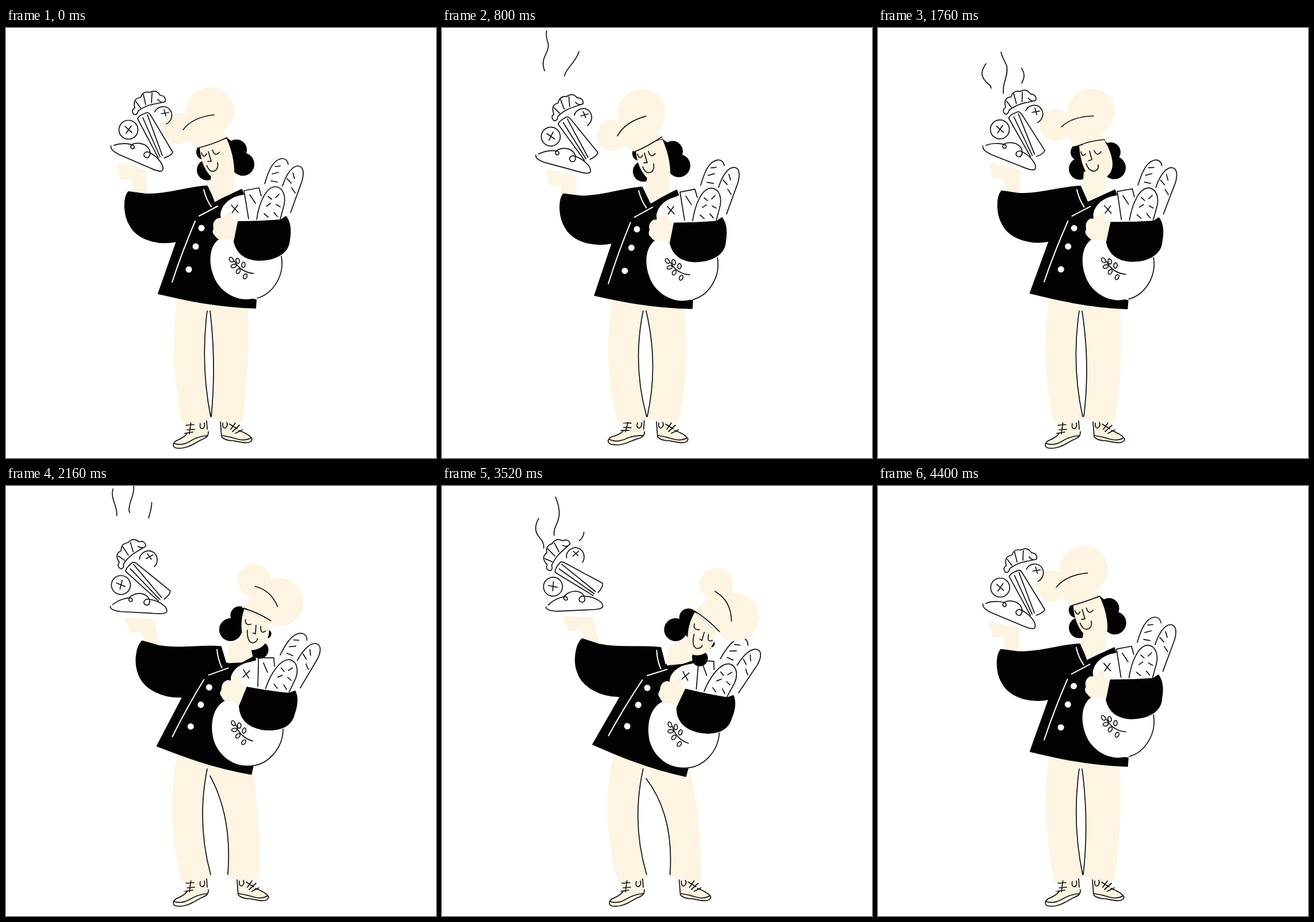
These frames come from a looping animation (748x748 px, 4480 ms). An HTML page:

```html
<!DOCTYPE html>
<html lang="en">
<head>
<meta charset="utf-8">
<title>Dancing baker</title>
<style>
html, body { margin: 0; width: 100%; height: 100%; overflow: hidden; background: #fff; }
svg { display: block; width: 100vw; height: 100vh; }
.ink { fill: none; stroke: #111; stroke-width: 1.7; stroke-linecap: round; stroke-linejoin: round; }
.chalk { fill: none; stroke: #fff; stroke-width: 2; stroke-linecap: round; }
.cream { fill: #fdf4e2; }
.black { fill: #030303; }
.white { fill: #fff; }
</style>
</head>
<body>
<svg viewBox="0 0 748 748">
  <g id="shoeL">
    <path class="cream" d="M308 684L350 682L351 706Q348 714 336 718Q316 732 299 731Q288 728 295 719Q312 712 316 702Z"/>
    <path class="ink" d="M349 682L350 698M352 702Q353 711 343 715C330 720 318 732 300 731C289 731 289 723 296 718Q311 712 315 705M293 723Q305 727 318 720Q334 710 351 709M322 684L319 706M313 691L327 690M315 699L328 698M311 705L325 703M338 688Q336 697 342 697Q347 694 345 687"/>
  </g>
  <g id="shoeR">
    <path class="cream" d="M373 684L400 684L406 699Q428 706 428 716Q422 723 398 719L376 713Z"/>
    <path class="ink" d="M373 685L375 711Q380 718 396 718C410 721 427 725 428 715Q424 707 405 700M376 709Q390 711 402 715Q416 719 426 713M377 687Q376 696 381 696Q387 692 384 686M389 689L402 697M391 698L399 687M394 702L406 691M399 705L411 699"/>
  </g>
  <path id="legL" class="cream"/>
  <path id="legR" class="cream"/>
  <path id="seams" class="ink"/>

  <g id="palm">
    <path class="cream" d="M193 240Q195 234 204 237L222 242Q236 243 245 249L245 290L218 290Q222 273 217 264Q208 264 200 263Q194 261 199 256Q193 253 197 249Q192 246 193 240Z"/>
  </g>
  <g id="torso">
    <path class="black" stroke="#030303" stroke-width="2" stroke-linejoin="round" d="M350 275C320 276 280 290 243 289L213 285C204 296 205 325 215 342C228 368 265 378 297 371L265 462C300 470 360 485 434 487L435 473L400 465L390 300L413 289L410 281L363 303Z"/>
    <path class="chalk" d="M344 281Q348 298 357 311M336 327L368 310M329 336Q306 390 289 442"/>
    <g class="white"><circle cx="340" cy="348" r="5.5"/><circle cx="330" cy="380" r="5.5"/><circle cx="318" cy="420" r="5.5"/></g>
  </g>
  <g id="bag">
    <path class="white" d="M413 290C390 293 374 308 373 325C374 335 380 350 372 366C354 378 352 405 360 428C368 455 395 473 420 472C455 470 480 445 480 410L480 340Z"/>
    <path class="ink" d="M479 397C485 430 465 462 437 470M392 308L404 321M403 308L393 322"/>
    <path class="ink" d="M450 271C456 250 464 229 480 227Q489 227 491 237M463 254L474 251M468 241L477 240M461 266L472 268"/>
    <path class="ink white" style="fill:#fff" d="M481 275C487 256 497 240 508 240C519 241 518 255 515 266L495 321M489 262L496 270M499 252L502 262M497 278L503 287"/>
    <path class="ink" d="M422 332L414 283L440 278L444 292M424 290L434 305"/>
    <path class="ink" style="fill:#fff" d="M436 333C440 305 452 277 468 276C484 277 486 295 484 306L477 333M456 293L462 298M469 295L475 289M453 310L460 305M470 307L477 311M449 323L456 329M466 321L472 328"/>
    <g class="ink" id="sprig"><path d="M397 405Q408 425 431 427"/></g>
    <path class="cream" d="M386 320Q391 314 394 324L392 331L405 340L398 374Q388 365 378 368Q368 369 364 362Q357 357 361 349Q358 337 368 331Q380 332 386 320Z"/>
    <path class="black" stroke="#030303" stroke-width="2" stroke-linejoin="round" d="M404 337Q440 337 478 334L487 328C493 336 496 350 493 368C492 392 468 404 440 404C415 403 402 392 397 372Z"/>
  </g>

  <g id="head">
    <g id="hair" class="black"></g>
    <g id="face"></g>
    <g id="hat"></g>
  </g>

  <g id="food" class="ink">
    <path transform="translate(1 -5) rotate(24.4 181 212)" d="M185 207C195 197 209 193 216 193C222 196 217 202 213 198C210 191 222 184 233 184C245 185 251 194 248 202C240 207 235 197 243 193C261 192 279 202 280 211C280 217 265 217 250 217L200 218Q181 217 181 210"/>
    <g id="pile">
      <circle cx="213" cy="177" r="16.5"/>
      <path d="M207 171L219 182M218 170L209 183"/>
      <path d="M259 146C262 136 280 132 287 145C291 155 286 163 279 167M270 149L283 147M275 142L278 153"/>
      <path d="M265 226L229 158Q230 152 246 147Q250 148 253 154L290 216Q288 222 275 226M246 151L272 222M238 156L268 224"/>
      <path d="M222 150Q217 143 224 139Q220 122 234 121Q238 109 250 112Q262 106 268 117Q279 118 277 128Q270 132 264 124M222 150Q228 153 230 144Q240 137 250 134Q262 131 270 130M226 128L234 139M239 116L243 133M254 113L253 130"/>
    </g>
  </g>
  <g id="steam" class="ink"></g>
</svg>
<script>
const LOOP = 4480, STEP = 80;
const $ = id => document.getElementById(id);
const lerp = (a, b, u) => a + (b - a) * u;

function add(parent, tag, attrs) {
  const el = document.createElementNS('http://www.w3.org/2000/svg', tag);
  for (const name in attrs) el.setAttribute(name, attrs[name]);
  return parent.appendChild(el);
}

// Smooth monotone curve through [time, value] pairs.
function track(...keys) {
  const slope = i => (keys[i + 1][1] - keys[i][1]) / (keys[i + 1][0] - keys[i][0]);
  const tangent = i => {
    if (i === 0 || i === keys.length - 1) return 0;
    const a = slope(i - 1), b = slope(i);
    return a * b <= 0 ? 0 : 2 * a * b / (a + b);
  };
  return t => {
    let i = 0;
    while (i < keys.length - 2 && t >= keys[i + 1][0]) i++;
    const [t0, v0] = keys[i], [t1, v1] = keys[i + 1];
    const d = t1 - t0, u = Math.min(1, Math.max(0, (t - t0) / d)), s = u * u * (3 - 2 * u);
    return lerp(v0, v1, s) + d * u * (1 - u) * (tangent(i) * (1 - u) - tangent(i + 1) * u);
  };
}

const reach = track([0, 0], [400, 1], [640, 1.4], [1120, .7], [1200, .53], [1700, 0], [LOOP, 0]);
const bob = track([0, 0], [400, 2.4], [1200, 2.4], [1720, 0], [LOOP, 0]);
const lean = track([0, 0], [1600, 0], [1760, .07], [2240, .93], [2400, 1.02], [2560, 1], [3520, 1.06],
  [3840, 1.05], [3920, .95], [4240, .2], [4400, .03], [LOOP, 0]);
const turn = track([0, 0], [1280, 0], [1760, 1], [2240, 1.9], [2560, 2], [3840, 2], [4240, .7], [4400, .2], [LOOP, 0]);
const nod = track([0, 0], [2560, 0], [3520, 1], [3800, 1], [4100, 0], [LOOP, 0]);
const tilt = track([0, 0], [400, -4], [1200, -12], [1760, 0], [LOOP, 0]);
const knees = track([0, 0], [400, 1], [1200, .5], [1760, .2], [2400, 1], [3900, 1], [4400, .1], [LOOP, 0]);
const stride = track([0, 0], [1700, 0], [1760, .03], [2240, .95], [2560, 1], [3520, 1.2], [3880, 1.2], [4320, .08], [4400, 0], [LOOP, 0]);
const TAPS = [400, 880, 1400, 3120, 3760];
const tap = t => Math.max(...TAPS.map(c => Math.abs(t - c) < 160 ? Math.cos((t - c) / 320 * Math.PI) : 0));

// Head parts facing left, front and right.
const morphs = [];
function part(parent, cls, ...poses) {
  morphs.push({ el: add($(parent), 'path', { class: cls }), poses });
}
function ball(parent, cls, ...poses) {
  morphs.push({ el: add($(parent), 'circle', { class: cls }), poses, round: true });
}
ball('hair', '', '344 216 13', '350 216 15', '418 227 16');
ball('hair', '', '350 247 18', '351 245 19', '399 251 20');
ball('hair', '', '401 212 18', '405 216 17', '464 266 6');
ball('hair', '', '412 237 20', '411 243 20', '448 294 14');
part('hair', '', 'M336 207L383 190L405 206L397 246L345 240Z', 'M347 207L393 194L408 210L408 245L355 240Z',
  'M424 213L468 243L464 275L446 285L410 250Z');
part('face', 'cream', 'M358 250L397 245L396 284L363 303L354 276Z', 'M358 250L398 245L397 282L365 302L356 276Z',
  'M392 282L425 262L436 300L420 308L393 315Z');
part('face', 'cream', 'M337 206L383 191C390 205 396 225 397 245C398 262 388 268 372 266C355 264 338 240 337 206Z',
  'M350 205L393 194C402 208 408 225 408 238C407 255 395 264 380 264C362 262 352 235 350 205Z',
  'M428 216L468 243C470 252 469 262 466 268C462 282 450 290 437 290C420 284 416 240 428 216Z');
part('face', 'ink', 'M340 217Q344 228 349 219', 'M353 215Q356 226 361 219', 'M430 236Q428 247 440 245');
part('face', 'ink', 'M359 212Q363 225 371 216', 'M376 213Q381 225 388 215', 'M457 251Q456 266 465 260');
part('face', 'ink', 'M352 215L357 232L351 232', 'M368 214L372 229L366 231', 'M449 248L447 263L443 261');
part('face', 'ink', 'M349 239Q355 253 364 248Q370 244 368 234', 'M362 236Q367 250 377 249Q385 246 383 238',
  'M432 254Q430 275 440 278Q448 277 449 271');
ball('hat', 'cream', '355 145 42', '371 146 41', '498 214 42');
ball('hat', 'cream', '299 175 27', '309 169 28', '458 163 29');
part('hat', 'cream', 'M315 165L313 192L333 209Q358 205 383 190L368 165Z', 'M328 165L331 188L340 206Q366 200 394 194L380 165Z',
  'M458 180L447 191L425 213Q450 225 475 243L490 250Z');
part('hat', 'ink', 'M333 209Q358 203 384 191', 'M348 205Q368 196 394 194', 'M427 214Q452 225 475 243');
part('hat', 'ink', 'M308 177Q325 155 362 151', 'M319 172Q338 154 375 153', 'M457 175Q487 187 493 222');

const NUMBER = /-?[\d.]+/g;
function blend(a, b, u) {
  const target = b.match(NUMBER);
  let i = 0;
  return a.replace(NUMBER, n => lerp(+n, +target[i++], u).toFixed(2));
}

for (const [x, y, r] of [[392, 403, -35], [403, 405, -15], [413, 412, 5], [396, 414, 75], [404, 423, 30], [416, 432, 25]])
  add($('sprig'), 'ellipse', { cx: x, cy: y, rx: 3, ry: 4.6, transform: `rotate(${r} ${x} ${y})` });

// Steam wisps: path, start, end, visible share of the path.
const wisps = [
  ['M184 157C182 130 192 122 191 100C190 85 183 90 177 70C172 50 186 45 185 28Q180 14 182 5', 120, 1160, .57],
  ['M208 109Q214 100 212 91C212 70 230 65 238 42Q241 30 246 19', 330, 1420, .5],
  ['M190 178Q186 168 187 158C190 135 205 120 195 100C176 85 178 75 190 59C200 40 180 25 186 5', 1136, 2500, .27],
  ['M208 145C214 130 220 125 218 113C216 95 227 85 224 66C220 56 216 52 214 42C214 25 224 18 222 -4', 1300, 2480, .48],
  ['M245 108Q251 103 250 96C256 85 255 78 249 69C243 55 258 40 252 20', 1480, 2550, .3],
  ['M177 108C178 90 162 90 163 72Q164 62 170 54C176 40 168 25 172 5', 3280, 4200, .52],
  ['M195 86C193 70 205 65 204 45Q203 32 197 18Q194 8 196 -10', 3185, 4200, .7],
  ['M239 95Q246 90 247 80C250 60 240 45 246 20', 3448, 4250, .5]
].map(([d, start, end, share]) => ({ el: add($('steam'), 'path', { d, pathLength: 1 }), start, end, share }));

function drawSteam(t) {
  for (const { el, start, end, share } of wisps) {
    const q = (t - start) / (end - start), on = q > 0 && q < 1;
    el.style.display = on ? '' : 'none';
    if (!on) continue;
    const front = (1 + share) * q ** .8, back = Math.max(0, front - share);
    el.setAttribute('stroke-dasharray', `${Math.max(.001, Math.min(1, front) - back)} 3`);
    el.setAttribute('stroke-dashoffset', -back);
  }
}

function drawHead(h) {
  const i = Math.min(1, Math.floor(h));
  for (const { el, poses, round } of morphs) {
    const shape = blend(poses[i], poses[i + 1], h - i);
    if (!round) el.setAttribute('d', shape);
    else shape.split(' ').forEach((v, n) => el.setAttribute(['cx', 'cy', 'r'][n], v));
  }
}

function drawLegs(k, p) {
  const dx = 33 * p;
  const outL = `Q${284 - 10 * k} 575 306 688`, inL = `Q${338 - 9 * k} 585 356 676`;
  const inR = `Q${366 + 14 * k + 20 * p} ${585 - 10 * p} ${357 + dx} 676`;
  const hipL = '350 492', hipR = `355 ${492 + 14 * p}`;
  $('legL').setAttribute('d', `M298 465${outL}L355 682L356 676Q${338 - 9 * k} 585 ${hipL}L360 470Z`);
  $('legR').setAttribute('d', `M345 470L${hipR}${inR}L${358 + dx} 681L${411 + dx} 687Q${426 + 11 * k + 13 * p} 580 ${420 + 7 * p} 480Z`);
  $('seams').setAttribute('d', `M${hipL}${inL}M${hipR}${inR}`);
}

function place(id, x, y, angle = 0, cx = 0, cy = 0) {
  $(id).setAttribute('transform', `translate(${x} ${y}) rotate(${angle} ${cx} ${cy})`);
}

function render(t) {
  const L = lean(t), w = reach(t), b = bob(t), n = nod(t), p = stride(t);
  drawLegs(knees(t), p);
  place('shoeL', 0, 0, 10 * tap(t), 350, 705);
  place('shoeR', 33 * p, 0);
  place('torso', 4 * L, b - 2 * L, 10 * L - .6 * w, 318, 420);
  place('bag', 24 * L, b + 15 * L, 13 * L, 398, 314);
  place('palm', 26 * L - 9 * w, 8 * w - 17 * L, -13 * L, 232, 286);
  place('food', -L - 15 * w, 5 * L + 12.5 * w, -24.4 * L - 6.4 * w, 182, 207);
  place('pile', 0, 0, -5 * n, 232, 222);
  place('head', 0, b, 8.5 * n, 410, 300);
  place('hat', 0, 0, tilt(t), 358, 198);
  drawHead(turn(t));
  drawSteam(t);
}

let begin;
function tick(now) {
  begin ??= now;
  render(Math.floor((now - begin) % LOOP / STEP) * STEP);
  requestAnimationFrame(tick);
}
render(0);
requestAnimationFrame(tick);
</script>
</body>
</html>
```
